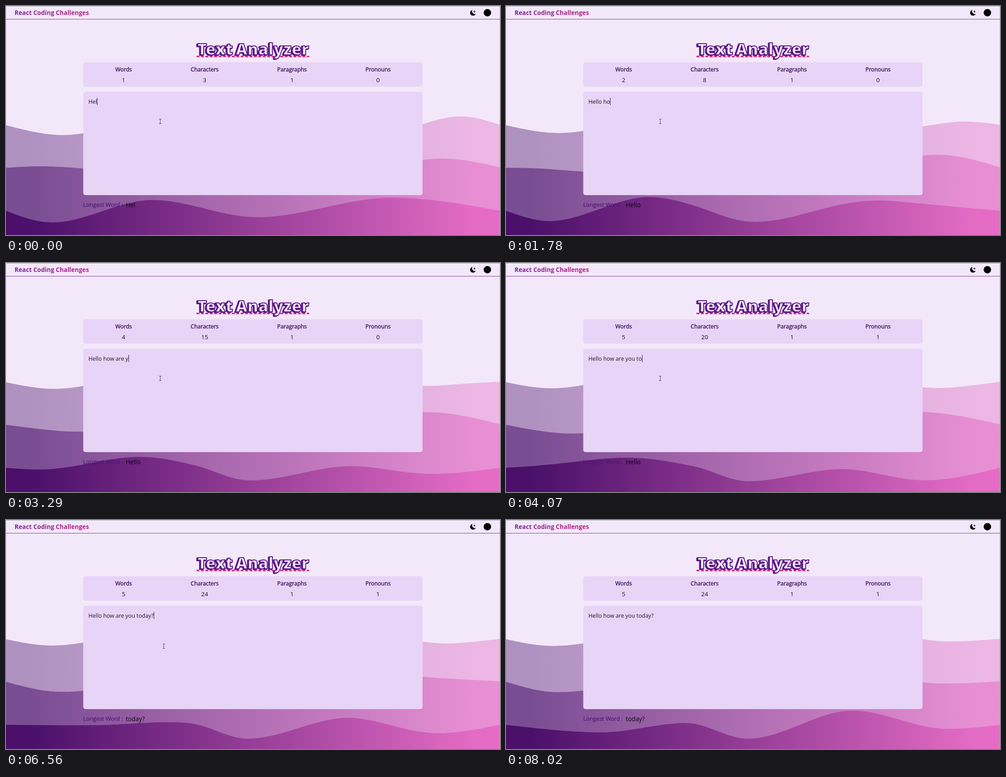
Recreate the animation shown at these times as an HTML page. Size 1097 px wide and 511 px high, loop 8.04 s.

```html
<!DOCTYPE html>
<html lang="en">
<head>
<meta charset="utf-8">
<title>Text Analyzer</title>
<style>
  html, body { margin: 0; width: 100%; height: 100%; overflow: hidden; background: #f3e8fa; }
  svg { display: block; width: 1097px; height: 511px; font-family: "Open Sans", "Noto Sans", sans-serif; }
  .brand { font-size: 13.6px; font-weight: 700; fill: url(#brand); }
  .title { font-size: 35.8px; font-weight: 800; word-spacing: -3px; text-anchor: middle; stroke: #5a1784; stroke-linejoin: round; }
  .label { font-size: 12.4px; text-anchor: middle; fill: #35104f; stroke: #35104f; stroke-width: .35px; }
  .count { font-size: 13.4px; text-anchor: middle; fill: #1c0a28; }
  .typed { font-size: 12.35px; fill: #1f1328; white-space: pre; }
  .caption { font-size: 12.65px; fill: #4d1673; stroke: #4d1673; stroke-width: .2px; }
  .longest { font-size: 13.7px; fill: #0d0512; }
  .panel { fill: #e8d4f6; }
</style>
</head>
<body>
<svg viewBox="0 0 1097 511">
  <defs>
    <linearGradient id="wave" gradientUnits="userSpaceOnUse" x1="0" x2="1097" y1="0" y2="0">
      <stop offset=".05" stop-color="#4a106a"/>
      <stop offset=".95" stop-color="#e46cc5"/>
    </linearGradient>
    <linearGradient id="brand">
      <stop offset="0" stop-color="#7c2396"/>
      <stop offset="1" stop-color="#b8247f"/>
    </linearGradient>
  </defs>

  <rect width="1097" height="511" fill="#f3e8fa"/>
  <g fill="url(#wave)">
    <path id="back" opacity=".4"/>
    <path id="middle" opacity=".53"/>
    <path id="front"/>
  </g>

  <rect width="1097" height="1" fill="#a9adb8"/>
  <rect x="1096" width="1" height="511" fill="#b9b3c4" opacity=".6"/>
  <rect y="29" width="1097" height="1" fill="#83389a"/>
  <text class="brand" x="19" y="20">React Coding Challenges</text>

  <path d="M1036 8.8A6.4 6.4 0 1 0 1043 17.4A5.8 5.8 0 0 1 1036 8.8Z"/>
  <path d="M1040.3 9.6l.8 2.1 2.1.8-2.1.8-.8 2.1-.8-2.1-2.1-.8 2.1-.8Z"/>
  <circle cx="1069" cy="15" r="8.3"/>

  <text class="title" x="547" y="109.5" fill="#5a1784" stroke-width="2.6">Text Analyzer</text>
  <text class="title" x="549" y="108.5" fill="#f3e8fa" stroke-width="2">Text Analyzer</text>
  <path d="M423 112.7H594M609 112.7H673" stroke="#d6257f" stroke-width="3.2" stroke-dasharray="6.6 3.2"/>

  <rect class="panel" x="171.5" y="125.5" width="753.5" height="54.5" rx="5"/>
  <rect class="panel" x="171.5" y="191.5" width="753.5" height="230.5" rx="5"/>

  <g class="label">
    <text x="261.2" y="146">Words</text>
    <text x="441.2" y="146">Characters</text>
    <text x="635.2" y="146">Paragraphs</text>
    <text x="826.2" y="146">Pronouns</text>
  </g>
  <g class="count">
    <text id="words" x="261.2" y="170"></text>
    <text id="chars" x="441.2" y="170"></text>
    <text x="635.2" y="170">1</text>
    <text id="pronouns" x="826.2" y="170"></text>
  </g>

  <text class="typed" id="typed" x="183" y="218"></text>
  <rect id="caret" y="205" width="1" height="16" fill="#1f1328"/>
  <text class="caption" x="171.5" y="448">Longest Word :</text>
  <text class="longest" id="longest" x="266" y="449"></text>

  <path id="beam" d="M-2.5 -5H2.5M0 -5V5M-2.5 5H2.5" fill="none" stroke="#4b4352"/>
  <path id="arrow" d="M0 0V12L2.8 9.4 4.6 13.4 6.4 12.6 4.6 8.8H8.4Z" fill="#fff" stroke="#222" stroke-width=".8"/>
</svg>
<script>
const $ = id => document.getElementById(id);
const mix = (a, b, p) => a + (b - a) * p;
const W = 1097, H = 511, LOOP = 8040;
const BLINK = 530, KEY_GAP = 150;

// A pose lists the crests and troughs between the two fixed ends.
// The loop opens on the first pose with its height scaled by swell.
const KEYS = [0, 500, 4500, LOOP];
const waves = [
  { id: 'back', ends: [266, 265], swell: 1.1, poses: [
    [[127, 286], [300, 262], [820, 286], [1010, 248]],
    [[98, 279], [350, 240], [820, 262], [965, 282]],
    [[104, 281], [350, 250], [820, 252], [985, 271]]
  ] },
  { id: 'middle', ends: [361, 360], swell: .65, poses: [
    [[75, 356], [330, 380], [780, 365], [970, 330]],
    [[142, 383], [350, 355], [890, 331]],
    [[113, 384], [350, 360], [800, 350], [970, 365]]
  ] },
  { id: 'front', ends: [457, 457], swell: .65, poses: [
    [[102, 497], [325, 420], [558, 479], [857, 412]],
    [[245, 434], [420, 456], [535, 488], [738, 463], [925, 493]],
    [[213, 474], [400, 453], [537, 488], [770, 425], [980, 466]]
  ] }
];

// Smooth curve: level at crests and troughs, free at both ends.
function curve(pts) {
  const n = pts.length - 1;
  const slope = (a, b) => (pts[b][1] - pts[a][1]) / (pts[b][0] - pts[a][0]);
  const m = pts.map((_, i) => {
    if (i === 0) return 1.5 * slope(0, 1);
    if (i === n) return 1.5 * slope(n - 1, n);
    return slope(i - 1, i) * slope(i, i + 1) > 0 ? slope(i - 1, i + 1) : 0;
  });
  return x => {
    const i = Math.min(n - 1, pts.findLastIndex(p => p[0] <= x));
    const [x0, y0] = pts[i], [x1, y1] = pts[i + 1];
    const w = x1 - x0, u = (x - x0) / w, v = 1 - u;
    return mix(y0, y1, u * u * (3 - 2 * u)) + w * u * v * (m[i] * v - m[i + 1] * u);
  };
}

for (const wave of waves) {
  const [y0, y1] = wave.ends;
  const shapes = wave.poses.map(p => curve([[0, y0], ...p, [W, y1]]));
  const opening = x => mix(mix(y0, y1, x / W), shapes[0](x), wave.swell);
  wave.shapes = [opening, ...shapes];
}

function drawWaves(t) {
  const k = KEYS.findLastIndex(key => key <= t);
  const p = (t - KEYS[k]) / (KEYS[k + 1] - KEYS[k]);
  for (const { id, shapes } of waves) {
    let d = `M0 ${H}`;
    for (let i = 0; i <= 200; i++) {
      const x = W * i / 200;
      d += `L${x} ${mix(shapes[k](x), shapes[k + 1](x), p)}`;
    }
    $(id).setAttribute('d', d + `V${H}Z`);
  }
}

// Each burst is typed at a steady pace from its start time.
const bursts = [
  { at: 160, text: 'lo ' },
  { at: 1600, text: 'how ' },
  { at: 2650, text: 'are you to' },
  { at: 4250, text: 'day' },
  { at: 5200, text: '?' }
];

function drawText(t) {
  let text = 'Hel', lastKey = 0;
  for (const burst of bursts.filter(b => b.at <= t)) {
    const n = Math.min(burst.text.length, 1 + Math.floor((t - burst.at) / KEY_GAP));
    text += burst.text.slice(0, n);
    lastKey = burst.at + (n - 1) * KEY_GAP;
  }
  const words = text.trim().split(' ');
  $('typed').textContent = text;
  $('words').textContent = words.length;
  $('chars').textContent = text.length;
  $('pronouns').textContent = words.filter(w => w === 'you').length;
  $('longest').textContent = words.reduce((a, b) => b.length > a.length ? b : a);

  $('caret').setAttribute('x', Math.round(183 + $('typed').getComputedTextLength()));
  $('caret').style.display = Math.floor((t - lastKey) / BLINK) % 2 ? 'none' : '';
}

// The pointer rests, then leaves through the bottom edge.
function drawPointer(t) {
  const go = Math.max(0, (t - 6350) / 1000) ** 1.5;
  const x = 342.5 + Math.round(83 * go);
  const y = 257.5 + Math.round(250 * go);
  const inside = y < 422;
  for (const id of ['beam', 'arrow']) {
    $(id).setAttribute('transform', `translate(${x} ${y})`);
    $(id).style.display = (id === 'beam') === inside ? '' : 'none';
  }
}

function draw() {
  const t = performance.now() % LOOP;
  drawWaves(t);
  drawText(t);
  drawPointer(t);
  requestAnimationFrame(draw);
}
draw();
</script>
</body>
</html>
```
